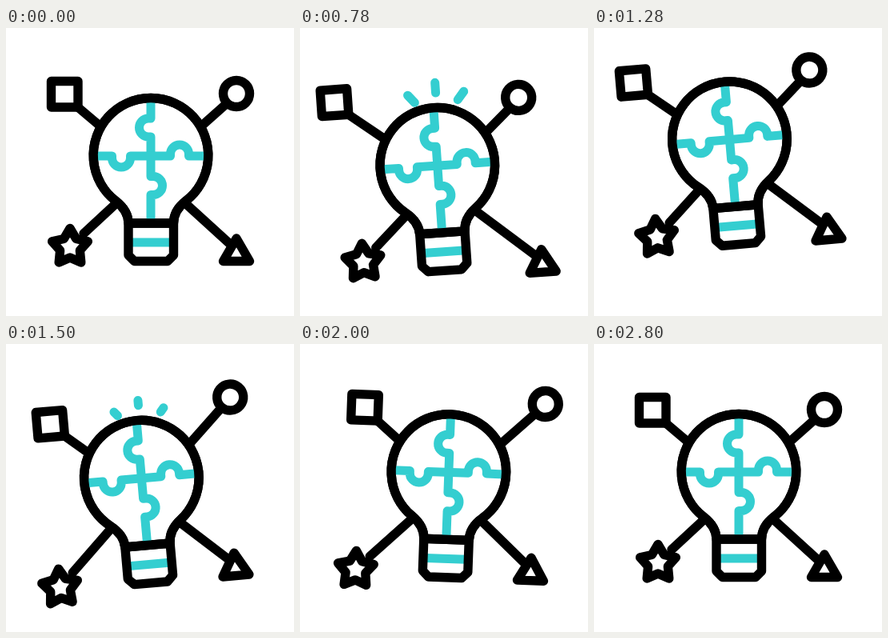
An HTML page that plays this animation: 360x360 px, repeating every 3 s.

```html
<!DOCTYPE html>
<html lang="en">
<head>
<meta charset="utf-8">
<style>
  html, body { margin: 0; width: 100%; height: 100%; overflow: hidden; background: #fff; }
  svg { display: block; width: 100%; height: 100%; fill: none; stroke: #000; stroke-width: 11.4;
        stroke-linecap: round; stroke-linejoin: round; }
  .teal { stroke: #34ced0; stroke-width: 11; }
</style>
</head>
<body>
<svg viewBox="0 0 360 360">
  <g id="icon">
    <g id="rays" class="teal"><path/><path/><path/></g>
    <g id="lines"><path/><path/><path/><path/></g>
    <g id="shapes">
      <path d="M56.5 66.5H90V99H56.5Z"/>
      <path d="M288 263L304.5 291.5H271.5Z"/>
      <circle cx="288" cy="82" r="16.5"/>
      <path id="star"/>
    </g>
    <path fill="#fff" d="M153 244C153 232 146 223 137 216A71.8 71.8 0 1 1 225 216C216 223 209.5 232 209.5 244Z"/>
    <g class="teal" stroke-linecap="butt">
      <path d="M181 92V113H178A11.5 11.5 0 0 0 178 136H181V185.5H184A11.5 11.5 0 0 1 184 208.5H181V240"/>
      <path d="M112 160H132.5V162.5A11.5 11.5 0 0 0 155.5 162.5V160H205.5V157.5A11.5 11.5 0 0 1 228.5 157.5V160H250"/>
      <path d="M156 268H206"/>
    </g>
    <path d="M153 244C153 232 146 223 137 216A71.8 71.8 0 1 1 225 216C216 223 209.5 232 209.5 244V284L202 291.5H160.5L153 284V244H209.5"/>
  </g>
</svg>
<script>
const LOOP = 3000;
const byId = id => document.getElementById(id);
const icon = byId('icon'), rays = byId('rays');
const lines = byId('lines').children, shapes = byId('shapes').children;

// Keys are [time, value]; every span eases in and out.
const tilt = [[200, 0], [340, 3.7], [540, -4.8], [740, -4.8], [940, 3.7], [1050, 3.7],
              [1290, -5], [1510, -5], [1740, 3.8], [1765, 3.8], [2270, 0]];
const lift = [[200, 0], [345, 10.5], [505, -21], [740, 11.8], [905, 11.8], [1290, -21],
              [1560, 11], [1740, 11], [2030, 0]];
const reachA = [[525, 0], [965, 29.5], [1430, 0]];
const reachB = [[1270, 0], [1680, 30], [1750, 30], [2270, 0]];

// Each arm: bulb end, shape end, outward direction, distance track.
const arms = [
  { from: [117, 122], to: [91, 100], dir: [-.83, -.56], reach: reachA },
  { from: [224, 219], to: [280, 270], dir: [.83, .56], reach: reachA },
  { from: [246, 121], to: [273, 97], dir: [.68, -.74], reach: reachB },
  { from: [138, 219], to: [97, 257], dir: [-.68, .74], reach: reachB }
];

function track(keys, t) {
  if (t <= keys[0][0]) return keys[0][1];
  for (let i = 1; i < keys.length; i++) {
    const [t0, v0] = keys[i - 1], [t1, v1] = keys[i];
    if (t < t1) return v0 + (v1 - v0) * (1 - Math.cos(Math.PI * (t - t0) / (t1 - t0))) / 2;
  }
  return keys[keys.length - 1][1];
}

const clamp = x => Math.max(0, Math.min(1, x));

byId('star').setAttribute('d', 'M' + Array.from({ length: 10 }, (_, i) => {
  const a = i * Math.PI / 5, r = i % 2 ? 13 : 23.5;
  return [80 + r * Math.sin(a), 274 - r * Math.cos(a)];
}).join('L') + 'Z');

function drawRays(t) {
  const age = t < 1400 ? t - 690 : t - 1455;
  const on = age > 0 && age < 400;
  rays.style.display = on ? '' : 'none';
  if (!on) return;
  const head = 28 * clamp(age / 200), tail = 28 * clamp((age - 150) / 220);
  [-1, 0, 1].forEach((side, i) => {
    const x = 185 + side * 27, y = 159 - (side ? 79.5 : 90);
    const dx = side * .64, dy = side ? -.77 : -1;
    rays.children[i].setAttribute('d',
      `M${x + dx * tail} ${y + dy * tail}L${x + dx * head} ${y + dy * head + .01}`);
  });
  rays.style.strokeWidth = 11 * clamp((400 - age) / 25);
}

function draw(now) {
  const t = now % LOOP;
  icon.setAttribute('transform', `translate(0 ${track(lift, t)}) rotate(${track(tilt, t)} 180.5 293)`);
  arms.forEach(({ from, to, dir, reach }, i) => {
    const d = track(reach, t), dx = dir[0] * d, dy = dir[1] * d;
    shapes[i].setAttribute('transform', `translate(${dx} ${dy})`);
    lines[i].setAttribute('d', `M${from}L${to[0] + dx} ${to[1] + dy}`);
  });
  drawRays(t);
}

const start = performance.now();
function tick() {
  draw(performance.now() - start);
  requestAnimationFrame(tick);
}
tick();
</script>
</body>
</html>
```
